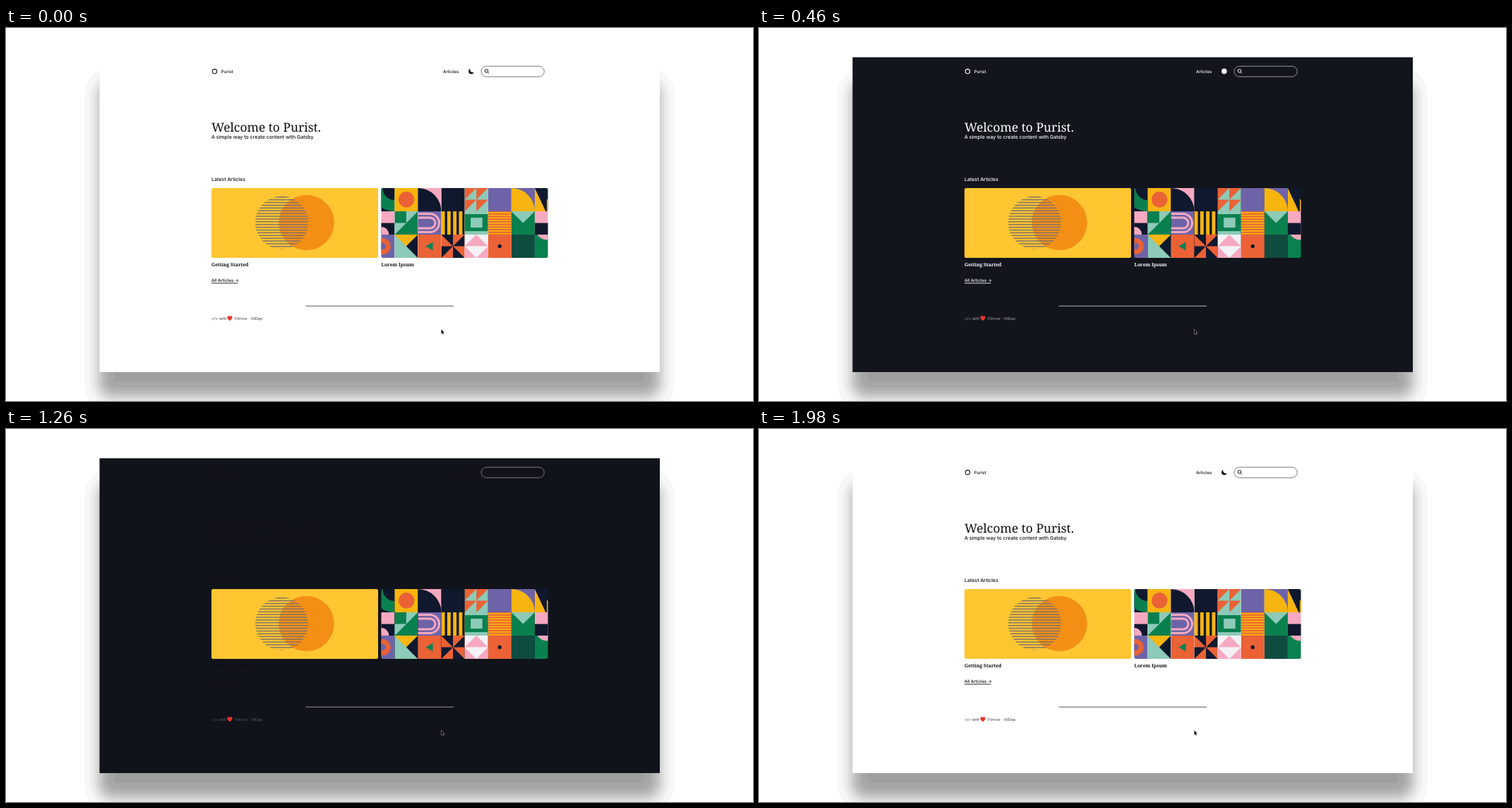
Animation of 1058 by 529 pixels, one loop 2 s. Source, as an HTML page:

```html
<!DOCTYPE html>
<html lang="en">
<head>
<meta charset="utf-8">
<title>Purist theme switch</title>
<style>
  html, body { margin: 0; width: 100%; height: 100%; overflow: hidden; background: #fff; }
  svg { display: block; width: 100vw; height: 100vh; --ink: #101014; --muted: #55565c; --line: #7b7b81; }
  text { font-family: Inter, sans-serif; font-size: 7px; font-weight: 450; fill: var(--ink); text-rendering: geometricPrecision; }
  .nav { font-size: 6.1px; font-weight: 500; }
  .serif { font-family: "Noto Serif", serif; font-size: 6.8px; font-weight: 550; }
  .title { font-size: 17.4px; font-weight: 450; }
  .foot { font-size: 5.4px; fill: var(--muted); }
  .outline { fill: none; stroke: var(--ink); }
  .rule { fill: none; stroke: var(--line); }
  .navy { fill: #10182e } .green { fill: #0b804f } .yellow { fill: #f8b510 } .orange { fill: #ea6236 }
  .pink { fill: #f6a9c0 } .mint { fill: #8dcab8 } .purple { fill: #6e63a8 } .white { fill: #f4f2f6 }
</style>
</head>
<body>
<svg id="stage" viewBox="0 0 1058 529">
  <defs>
    <clipPath id="sunClip"><circle cx="390.5" cy="276" r="37.5"/></clipPath>
    <clipPath id="cardClip"><rect x="531.5" y="227" width="236" height="99" rx="2.5"/></clipPath>
    <clipPath id="tileClip"><rect width="33" height="33"/></clipPath>
    <mask id="moonMask" maskUnits="userSpaceOnUse" x="650" y="52" width="20" height="20">
      <rect x="650" y="52" width="20" height="20" fill="#fff"/>
      <circle id="bite" r="4.2" fill="#000"/>
    </mask>
  </defs>

  <g id="shadow"></g>
  <rect id="page" x="132.5" y="41.5" width="793.5" height="446.5"/>

  <circle class="outline" cx="295.5" cy="61.6" r="3.2" stroke-width="1.1"/>
  <text class="nav" x="304.7" y="63.8">Purist</text>
  <text class="nav" x="619" y="63.8">Articles</text>
  <circle cx="658.9" cy="61.4" r="3.8" fill="var(--ink)" mask="url(#moonMask)"/>
  <rect class="rule" x="673" y="54.2" width="89.3" height="14.9" rx="7.45"/>
  <path class="outline" d="M682.2 62.6l1.8 1.8M682.8 60.8a2.3 2.3 0 1 0-4.6 0a2.3 2.3 0 1 0 4.6 0"/>

  <text class="serif title" x="291" y="147">Welcome to Purist.</text>
  <text x="291" y="157.3">A simple way to create content with Gatsby</text>
  <text x="291" y="216.7">Latest Articles</text>

  <rect x="291" y="227" width="236" height="99" rx="2.5" fill="#ffc632"/>
  <circle cx="425.5" cy="276" r="39.3" fill="#f48f15"/>
  <g id="stripes" clip-path="url(#sunClip)" fill="#7c7068"></g>
  <g clip-path="url(#cardClip)"><g id="mosaic"></g></g>

  <text class="serif" x="291" y="338.4">Getting Started</text>
  <text class="serif" x="531.5" y="338.4">Lorem Ipsum</text>
  <text class="nav" x="291" y="359.8">All Articles →</text>
  <path class="outline" d="M291 361.9H328.3" stroke-width=".9"/>
  <path class="rule" d="M424.5 394.3H634" stroke-width="1.3"/>

  <text class="foot" x="291" y="413.5">&lt;/&gt; with</text>
  <path d="M317 415.2C314.8 413.4 313.4 412 313.4 410.2C313.4 408 316 407.5 317 409.2C318 407.5 320.6 408 320.6 410.2C320.6 412 319.2 413.4 317 415.2Z" fill="#e5372e"/>
  <text class="foot" x="324" y="413.5">Flirrow</text>
  <text class="foot" x="343.2" y="413.5">·</text>
  <text class="foot" x="346.4" y="413.5">VilDep</text>

  <path d="M616.5 427.6v6.1l1.4-1.2 1 2.2 1-.4-1-2.2h1.9z" stroke="#fff" stroke-width=".7" paint-order="stroke"/>
</svg>
<script>
const $ = id => document.getElementById(id);
const rect = (color, x, y, w, h) => `<rect class="${color}" x="${x}" y="${y}" width="${w}" height="${h}"/>`;
const disc = (color, x, y, r) => `<circle class="${color}" cx="${x}" cy="${y}" r="${r}"/>`;
const poly = (color, points) => `<polygon class="${color}" points="${points}"/>`;
const fill = color => rect(color, 0, 0, 33.4, 33.4);
const repeat = (n, draw) => Array.from({ length: n }, (_, i) => draw(i)).join("");

// Banded soft shadow: contours of a blurred box, 35px below the window
const BANDS = 12;
$("shadow").innerHTML = repeat(BANDS, i => {
  const level = (i + .5) / BANDS;
  const out = 6.7 * Math.log((1 - level) / level);
  const grey = 255 - 8 * (i + 1);
  return `<rect x="${132 - out}" y="${76 - out}" width="${794 + 2 * out}" height="${447 + 2 * out}"
    rx="${23 + out * .8}" fill="rgb(${grey},${grey},${grey})"/>`;
});

$("stripes").innerHTML = repeat(20, i => rect("", 352, 239 + 3.9 * i, 77, 1.4));

// Each tile is 33 x 33; the first and last columns are cut by the card
const half = 16.5;
const tiles = [
  [
    fill("navy") + disc("green", 33, 0, 33) + disc("navy", 33, 0, 17),
    fill("yellow") + disc("orange", 16.8, 16.3, 11.2),
    fill("pink") + disc("navy", 0, 33, 33),
    fill("navy"),
    fill("mint") + repeat(4, i => {
      const x = half * (i % 2), y = half * (i >> 1);
      return poly("orange", [x, y, x + half, y, x, y + half]);
    }),
    fill("purple"),
    fill("purple") + disc("yellow", 0, 33, 33),
    fill("navy") + poly("yellow", [0, 0, 15.5, 33, 0, 33]) + rect("yellow", 17, 16, 4, 17)
  ], [
    fill("pink") + rect("navy", 0, half, 33, half) + disc("pink", 14, 33, 11),
    fill("green") + poly("mint", [half, 0, 33, 0, 0, 33, 0, half, half, half]),
    fill("purple") + [13, 7.5].map(r =>
      `<path d="M0 ${half - r}H17a${r} ${r} 0 0 1 0 ${2 * r}H0" fill="none" stroke="#f6a9c0" stroke-width="3"/>`).join(""),
    fill("yellow") + repeat(4, i => rect("navy", 5 + 8.25 * i, 0, 3.4, 33)),
    fill("mint") + rect("green", 0, 4, 33, 24) + rect("mint", 8.5, 9, half, 14),
    fill("orange") + repeat(9, i => rect("yellow", 0, 1 + 3.7 * i, 33, 1.8)),
    fill("green") + poly("mint", [0, 0, 33, 0, half, half]),
    fill("pink") + rect("navy", 0, half, 33, half)
  ], [
    fill("purple") + disc("orange", 16, half, 11.5) + disc("purple", 16, half, 4.5),
    fill("mint") + poly("yellow", [0, 0, 33, 0, half, half]) + poly("navy", [33, 0, 33, 33, half, half]),
    fill("orange") + poly("green", [11, half, 21, 10.5, 21, 22.5]),
    fill("orange") + repeat(4, i =>
      `<polygon class="navy" points="0,0 ${half},0 ${half},${half}" transform="rotate(${90 * i} ${half} ${half})"/>`),
    fill("white") + poly("pink", [half, 0, 33, half, 0, half]) + rect("pink", 0, half, 33, 17)
      + poly("white", [0, half, 33, half, half, 33]),
    fill("orange") + disc("navy", half, half, 2.7),
    `<rect width="33.4" height="33.4" fill="#0f4c3f"/>`,
    fill("green") + disc("pink", 18, -10, 17.5)
  ]
];
$("mosaic").innerHTML = tiles.map((row, y) => row.map((tile, x) =>
  `<g transform="translate(${517.2 + 33.1 * x} ${227 + 33 * y}) scale(1.004)" clip-path="url(#tileClip)">${tile}</g>`
).join("")).join("");

// cubic-bezier(.25, .1, .25, 1)
function ease(x) {
  if (x <= 0) return 0;
  if (x >= 1) return 1;
  const curve = (s, a, b) => 3 * (1 - s) ** 2 * s * a + 3 * (1 - s) * s * s * b + s ** 3;
  let low = 0, high = 1;
  for (let i = 0; i < 20; i++) {
    const mid = (low + high) / 2;
    if (curve(mid, .25, .25) < x) low = mid; else high = mid;
  }
  return curve(low, .1, 1);
}

const LOOP = 2000, TO_DARK = 346, TO_LIGHT = 1261, FADE = 130;
const LIGHT = [255, 255, 255], DARK = [17, 19, 27];
const stage = $("stage");

function render(now) {
  const t = now % LOOP;
  const shade = ease((t - TO_DARK) / FADE) - ease((t - TO_LIGHT) / FADE);
  const dark = t >= TO_DARK && t < TO_LIGHT;
  $("page").setAttribute("fill", `rgb(${LIGHT.map((c, i) => Math.round(c + (DARK[i] - c) * shade))})`);
  const colors = dark ? ["#fff", "#95969b", "#95969b"] : ["#101014", "#55565c", "#7b7b81"];
  ["--ink", "--muted", "--line"].forEach((name, i) => stage.style.setProperty(name, colors[i]));
  const shift = shade * 4.2;
  $("bite").setAttribute("cx", 661.3 + shift);
  $("bite").setAttribute("cy", 58.8 - shift);
  requestAnimationFrame(render);
}
render(performance.now());
</script>
</body>
</html>
```
